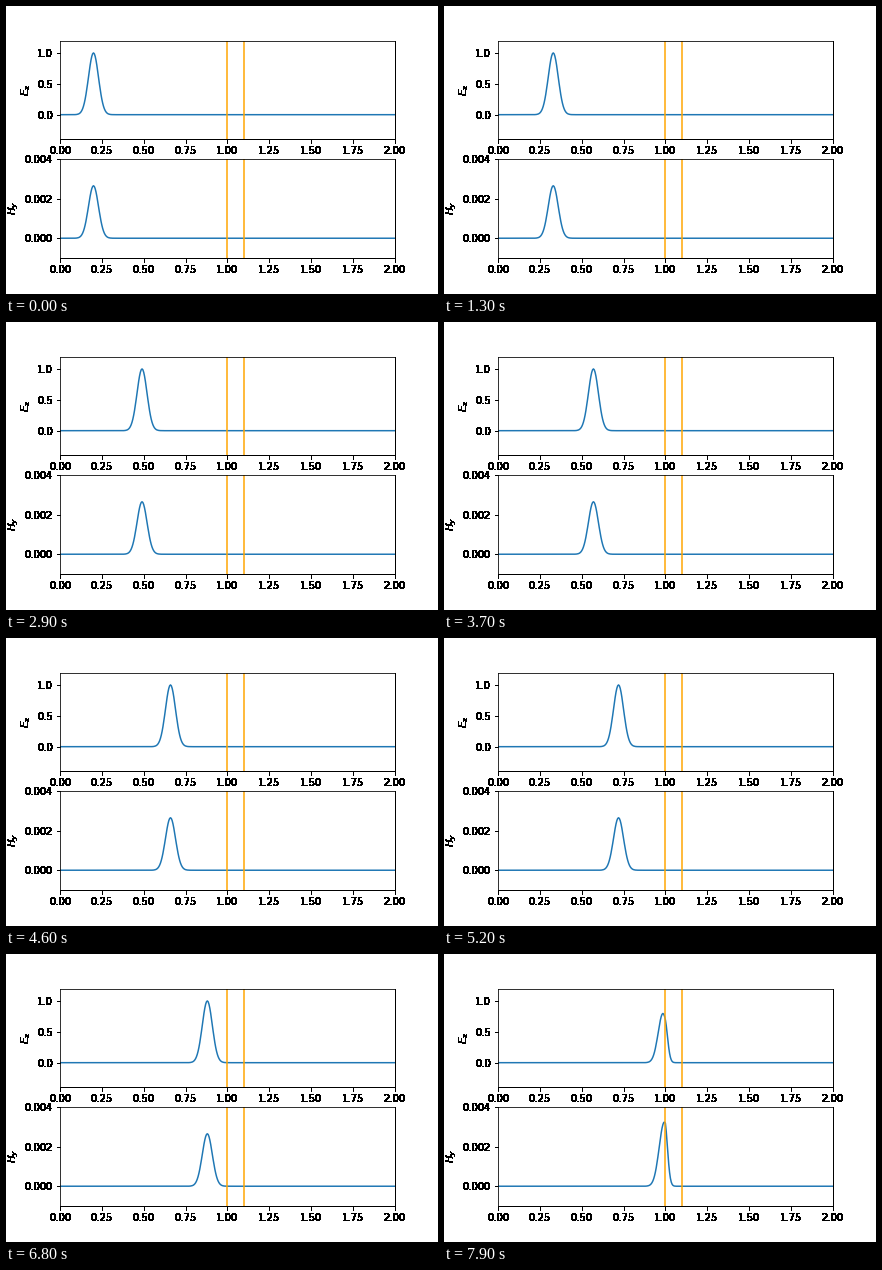
Animation, 432 px wide and 288 px high, one loop 8 s. Source, as a matplotlib script:

```python
import numpy as np
import matplotlib.pyplot as plt
from matplotlib.animation import FuncAnimation

FRAMES, INTERVAL = 80, 100
START, STEP, SIGMA = 0.2, 0.01, 0.03
SLAB = (1.0, 1.1)
INDEX = np.sqrt(3)           # refractive index of the slab
IMPEDANCE = 376.73
REFLECT = (INDEX - 1) / (INDEX + 1)
TRANSMIT = 2 / (INDEX + 1)

x = np.linspace(0, 2, 401)


def pulse(u):
    return np.exp(-u**2 / (2 * SIGMA**2))


def fields(center):
    """Electric and magnetic field of a pulse meeting the slab's front face."""
    face = SLAB[0]
    incident = pulse(x - center)
    echo = REFLECT * pulse(2 * face - x - center)
    passed = TRANSMIT * pulse(face + INDEX * (x - face) - center)
    outside = x < face
    e = np.where(outside, incident - echo, passed)
    h = np.where(outside, incident + echo, INDEX * passed)
    return e, h / IMPEDANCE


def harden(img, dpi):
    """Turn every partly covered pixel solid black."""
    img = img.copy()
    img[..., :3] = 0
    img[..., 3] = img[..., 3] > 0
    return img, 0, 0


def setup(ax, label, ylim, yticks):
    line, = ax.plot(x, np.zeros_like(x), color="#1f77b4", lw=1.5)
    for edge in SLAB:
        ax.axvline(edge, color="orange", lw=1.5)
    ax.set_xlim(0, 2)
    ax.set_ylim(*ylim)
    ax.set_xticks(np.arange(0, 2.01, 0.25))
    ax.set_yticks(yticks)
    ax.set_ylabel(label)
    for part in (ax.xaxis, ax.yaxis, ax.spines["right"], ax.spines["bottom"]):
        part.set_agg_filter(harden)
    return line


fig, (top, bottom) = plt.subplots(2, 1, figsize=(6, 4), dpi=72)
fig.subplots_adjust(left=0.125, right=0.9, bottom=0.125, top=0.88, hspace=0.2)
e_line = setup(top, "$E_z$", (-0.4, 1.2), [0, 0.5, 1])
h_line = setup(bottom, "$H_y$", (-0.001, 0.004), [0, 0.002, 0.004])


def update(i):
    e, h = fields(START + STEP * i)
    e_line.set_ydata(e)
    h_line.set_ydata(h)
    return e_line, h_line


anim = FuncAnimation(fig, update, frames=FRAMES, interval=INTERVAL,
                     repeat=True, repeat_delay=0, blit=False)
plt.show()
```
